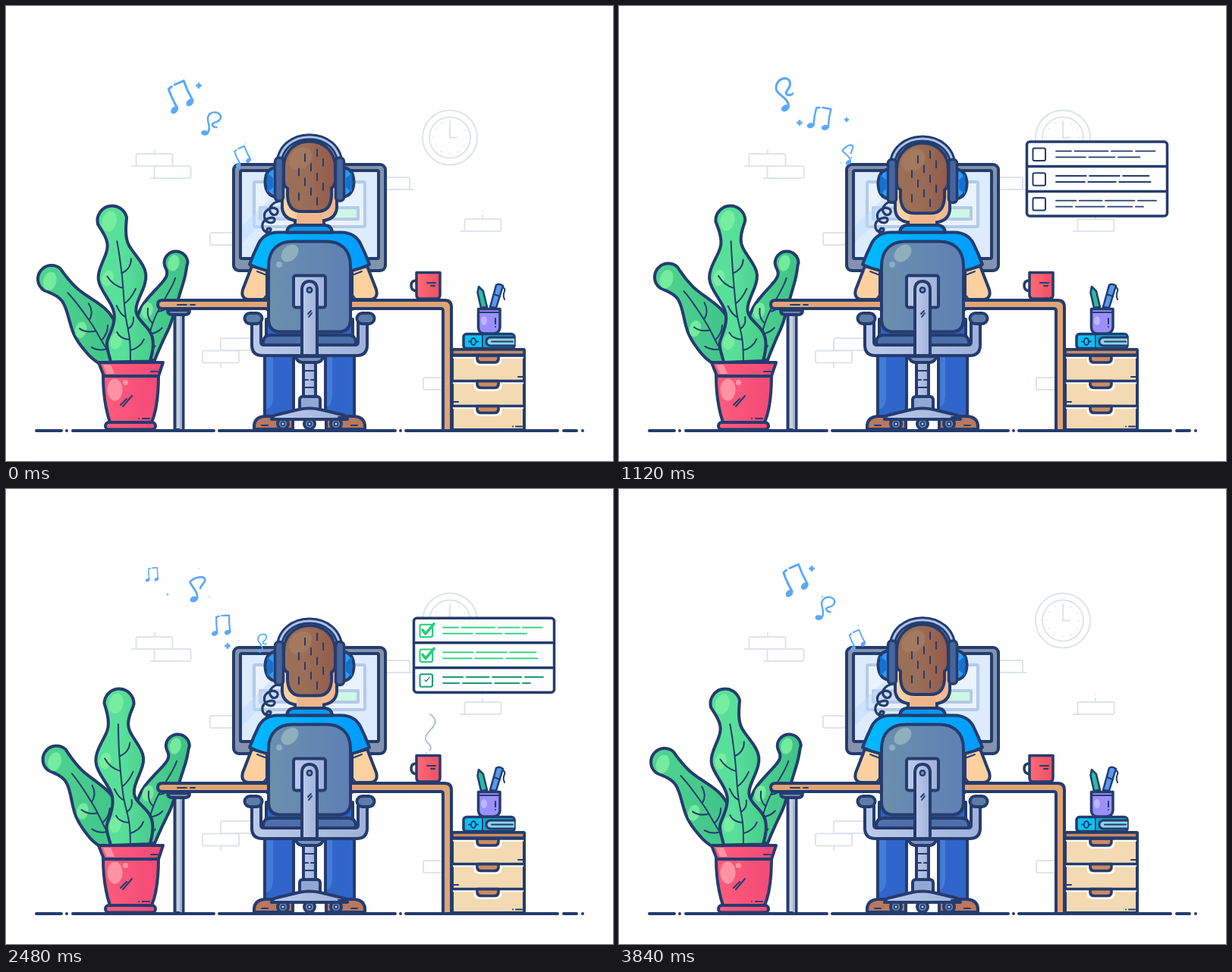
An HTML page that plays this animation: 800 px wide and 600 px high, repeating every 3880 ms.

```html
<!DOCTYPE html>
<html lang="en">
<head>
<meta charset="utf-8">
<title>Working day</title>
<style>
html, body { margin: 0; width: 100%; height: 100%; overflow: hidden; background: #fff; }
svg { display: block; width: 800px; height: 600px; }
.ink { stroke: #243c6e; stroke-width: 4; stroke-linejoin: round; stroke-linecap: round; }
.thin { stroke: #243c6e; stroke-width: 2; fill: none; stroke-linecap: round; stroke-linejoin: round; }
.wall { stroke: #dfe3ed; stroke-width: 2; fill: none; stroke-linecap: round; }
.flat { stroke: none; }
.note { stroke: #5aa9fb; fill: none; stroke-width: 2.6; stroke-linecap: round; stroke-linejoin: round; }
.note ellipse, #sparks { fill: #5aa9fb; stroke: none; }
.row { fill: none; stroke-width: 2; stroke-linecap: round; }
</style>
</head>
<body>
<svg viewBox="0 0 800 600">
<defs>
  <linearGradient id="gLeaf"><stop offset=".45" stop-color="#58e09a"/><stop offset="1" stop-color="#48cb8b"/></linearGradient>
  <linearGradient id="gSide"><stop offset="0" stop-color="#4fd592"/><stop offset="1" stop-color="#3fc187"/></linearGradient>
  <linearGradient id="gPot"><stop offset="0" stop-color="#ff5c7c"/><stop offset="1" stop-color="#f24a78"/></linearGradient>
  <linearGradient id="gHair"><stop offset=".4" stop-color="#9b6f57"/><stop offset="1" stop-color="#935a4b"/></linearGradient>
  <linearGradient id="gSkin"><stop offset="0" stop-color="#fdd6a6"/><stop offset="1" stop-color="#f2b38f"/></linearGradient>
  <linearGradient id="gShirt"><stop offset="0" stop-color="#00b9ff"/><stop offset="1" stop-color="#009bff"/></linearGradient>
  <linearGradient id="gChair"><stop offset="0" stop-color="#6b8fae"/><stop offset="1" stop-color="#5e80b4"/></linearGradient>
  <linearGradient id="gSteel"><stop offset="0" stop-color="#bccaea"/><stop offset="1" stop-color="#9fb1da"/></linearGradient>
  <linearGradient id="gMug"><stop offset="0" stop-color="#ff6b74"/><stop offset="1" stop-color="#ee4f66"/></linearGradient>
</defs>

<g class="wall">
  <g id="bricks"></g>
  <path d="M166 211h8M191 227h8M196 190v5M531 242h6M599 297h8M628 276v4M628 271v0M283 471v5"/>
  <circle cx="585" cy="173.500" r="36"/><circle cx="585" cy="173.500" r="27"/>
  <circle cx="585" cy="173.500" r="21.500" stroke-dasharray="0 11.258"/>
  <path d="M585 153v20.500h9"/>
</g>

<g id="list" class="ink" stroke-linejoin="round">
  <g id="card"><rect x="537.500" y="0" width="185" height="98" rx="4" fill="#fff" stroke-width="3.500"/>
  <path d="M538 32.500h184M538 65.500h184" stroke-width="3.500"/></g>
</g>

<g id="plant" class="ink"></g>
<g class="ink" fill="url(#gPot)">
  <path d="M128 487H201Q201 528 192 549H137Q128 522 128 487Z"/>
  <path d="M122 470H207L201 488H129Z"/><rect x="131" y="549" width="66" height="9.500" rx="4.500"/>
  <g class="flat" fill="#ff93a4"><ellipse cx="143.500" cy="506" rx="10" ry="14.500"/><circle cx="157.500" cy="496.500" r="3.500"/><path d="M128 473h10l5 12h-10Z"/></g>
  <path class="thin" d="M151 526l8-8M154 528l12-14M191 482h9M180 544h9M175 544h0"/>
</g>

<g class="ink">
  <rect x="300" y="209" width="200" height="140" rx="7" fill="#8493ad"/>
  <rect x="309" y="217" width="182" height="116" rx="2" fill="#dcebfe"/>
  <g class="flat">
    <g fill="none" stroke="#b4cae9" stroke-width="4"><rect x="327" y="232" width="146" height="59" rx="2" fill="#e9f3ff"/>
    <rect x="335" y="266" width="45" height="15" fill="#cfdcf1"/><rect x="420" y="266" width="44" height="15" fill="#cdf8e4"/></g>
    <path d="M311 312V290L384 219H408Z" fill="#c2dcfd" opacity=".5"/>
  </g>
</g>

<g id="sparks"></g>
<g id="notes"></g>

<g class="ink"><path fill="none" stroke-width="3.200" d="M361 257C350 259 344 268 350 274C354 278 361 273 357 268C350 263 338 270 341 280C343 287 355 288 354 281C352 276 336 281 338 292C340 300 350 299 349 294C345 291 341 296 345 304"/></g>

<g class="ink">
  <path d="M381 262H419V293H381Z" fill="#f3b98e"/>
  <g id="head">
    <g id="cup">
      <path d="M356 213Q342 214 341.500 232Q342 250 356 252Z" fill="#2a9cfb"/>
      <path class="flat" d="M344 220l8 7v12l-8 7Z" fill="#1570cf"/>
    </g>
    <use href="#cup" transform="matrix(-1 0 0 1 800 0)"/>
    <path d="M364 232V266Q365 280 381 283H419Q435 280 436 266V232Z" fill="url(#gSkin)"/>
    <path class="flat" d="M383 274H417V288H383Z" fill="#f1b58c"/>
    <path d="M360 212C358 159.500 442 159.500 440 212" fill="none" stroke-width="9"/>
    <path d="M360 212C358 159.500 442 159.500 440 212" fill="none" stroke="#aac4ee" stroke-width="3"/>
    <path d="M366 213C366 167 434 167 434 213V231Q433 238 429 240V250Q428 271 411 271H389Q372 271 371 250V240Q366 238 366 231Z" fill="url(#gHair)"/>
    <ellipse class="flat" cx="388" cy="201" rx="17" ry="13" fill="#aa8063" opacity=".6" transform="rotate(-40 388 201)"/>
    <path id="hair" class="thin"/>
    <g id="clip"><rect x="354.500" y="200" width="11" height="57" rx="5" fill="#46659d" stroke-width="3.500"/></g>
    <use href="#clip" transform="matrix(-1 0 0 1 800 0)"/>
  </g>
</g>

<g class="ink">
  <g id="arm"><path d="M324 343L312 374Q309 386 320 387H350V350Z" fill="#fcd09f"/><path class="thin" d="M331 350l13 5M344 380l-4 5"/></g>
  <use href="#arm" transform="matrix(-1 0 0 1 800 0)"/>
  <path d="M358 298.500H442Q460 299 467 313Q474 327 479 341Q468 346 456 349V400H344V349Q332 346 321 341Q326 327 333 313Q340 299 358 298.500Z" fill="url(#gShirt)"/>
  <path d="M370 298.500Q371 289 381 289H419Q429 289 430 298.500Z" fill="#0b98ec"/>
</g>

<g class="ink">
  <g id="leg">
    <path d="M341 458H379V541H341Z" fill="#3065cb"/>
    <path d="M327 558V553Q328 542 341 541H378V558Z" fill="#b97860"/>
    <path class="thin" d="M337 553h8"/>
  </g>
  <use href="#leg" transform="matrix(-1 0 0 1 800 0)"/>
  <path class="flat" d="M343 460h9v58q-1 12-9 14ZM423 460h7v55q-1 12-7 14Z" fill="#437bd8"/>
  <rect x="222.500" y="405" width="11" height="154" fill="#c8d1e2"/>
  <path class="flat" d="M229 408h3v150h-3Z" fill="#a5b3cc"/>
  <path d="M213 401H242Q242 407 236 407H219Q213 407 213 401Z" fill="#7187b4"/>
  <path d="M206 388H578Q587 388 587 397V560H576V402Q576 399 573 399H206Q200 399 200 393.500Q200 388 206 388Z" fill="#e2a474"/>
  <path class="thin" d="M226 394h12M243 394h6"/>
</g>

<g class="ink">
  <path d="M343 413H457V440H343Z" fill="#2d62c8"/>
  <path d="M339 448V442Q340 434 349 434H451Q460 434 461 442V448Z" fill="#4d6faa"/>
  <path d="M324 418V447Q324 461 338 461H462Q476 461 476 447V418H464V443Q464 447 460 447H340Q336 447 336 443V418Z" fill="url(#gSteel)"/>
  <g fill="#5d7da9"><rect x="314.500" y="405" width="23" height="14" rx="7"/><rect x="462.500" y="405" width="23" height="14" rx="7"/></g>
  <path d="M346 414V343C346 320 360 310.500 378 310.500H422C440 310.500 454 320 454 343V414Q453 429 440 429.500H360Q347 429 346 414Z" fill="url(#gChair)"/>
  <g class="flat" fill="#8eb0bd"><ellipse cx="374" cy="326" rx="13" ry="9.500" transform="rotate(-45 374 326)"/><circle cx="360" cy="341" r="4"/></g>
  <rect x="379" y="355.500" width="42" height="42" rx="3" fill="url(#gSteel)"/>
  <path d="M382 462H418Q417 469 410 470H390Q383 469 382 462Z" fill="#7890bf"/>
  <rect x="392" y="470" width="16" height="48" fill="url(#gSteel)"/>
  <path class="thin" d="M393 481h14M393 493h5M402 493h5M393 503h14"/>
  <path d="M390 461V373Q391 363 400 363Q409 363 410 373V461Z" fill="url(#gSteel)"/>
  <circle cx="400" cy="374.500" r="3.200" fill="#8499c6" stroke-width="2.500"/>
  <path class="thin" d="M398 406l4-4M399 410l4-5"/>
  <rect x="387" y="515" width="27" height="20" rx="4" fill="#91a7d4"/>
  <g id="wheels" fill="#7895c2"></g>
  <path d="M350 545Q351 540 357 539L386 532Q400 529 414 532L443 539Q449 540 450 545Z" fill="url(#gSteel)"/>
  <path class="thin" d="M438 542h8"/>
</g>

<path id="steam" fill="none" stroke="#a9bfe9" stroke-width="2" stroke-linecap="round" pathLength="1" d="M554 348C559 346 562 341 558 337C552 332 551 328 555 323C559 317 565 314 566 307C565 302 562 299 559 297"/>

<g class="ink">
  <path d="M541 362Q534 362 534 368.500Q534 375 541 376" fill="none" stroke-width="3.500"/>
  <path d="M541 351.500H572V381Q572 386 567 386H546Q541 386 541 381Z" fill="url(#gMug)" stroke-width="3.500"/>
  <path class="thin" d="M555 365h11M560 369h5"/>
  <rect x="588" y="453" width="95" height="106" rx="2" fill="#f3dab3"/>
  <path d="M588 453H683V460H588Z" fill="#c98b61" stroke-width="3.500"/>
  <g id="drawer"><path d="M590 463.500H618V469Q619 473 624 473H646Q651 473 652 469V463.500H681" stroke="#fff" stroke-width="2.500" fill="none"/>
  <path d="M621 461H649V466Q648 470 644 470H626Q622 470 621 466Z" fill="#cd8a5f" stroke-width="3.500"/><path d="M588 461H683" stroke-width="3.500"/></g>
  <use href="#drawer" y="33.500"/><use href="#drawer" y="66.500"/>
  <path class="thin" d="M675 489h6M590 522h6M672 554.500h8M668 554.500h0"/>
  <rect x="603" y="432.500" width="67" height="19" rx="4" fill="#08c3f2" stroke-width="3.500"/>
  <path class="flat" d="M630 434h38v16h-38Z" fill="#119fc4"/>
  <path d="M670 437H638Q633 438 633 442.500Q633 447 638 448H670" fill="#8fd3e6" stroke-width="3"/>
  <path class="thin" d="M628 433v18M640 442.500h28M610 442.500h3M619 442.500h3"/><ellipse class="thin" cx="616" cy="442.500" rx="3" ry="4.500"/>
  <path d="M626 398L621.500 378L623 370L629 376L634 397Z" fill="#28bda0" stroke-width="2.500"/>
  <path d="M638 397L646 368Q650 365 655 369L646 398Z" fill="#559af0" stroke-width="2.500"/>
  <path class="thin" d="M655 371q4 2 1 8q-1 4 1 8M643 380l8 3"/>
  <path d="M622.500 399.500H651V424Q650 432 642 432H631Q623 432 622.500 424Z" fill="#9b90fa" stroke-width="3.500"/>
  <path class="thin" d="M624 404h26M645 412v7M645 423v0"/><ellipse class="flat" cx="630" cy="415" rx="4" ry="6" fill="#beb5ff"/>
</g>
<path class="ink" fill="none" d="M40 560H73M80 560h0M88 560H274M281 560H513M520 560h0M527 560H727M735 560H752M760 560h0"/>
</svg>

<script>
const LOOP = 3880, HALF = LOOP / 2, STEP = 40, TAU = 2 * Math.PI;
const NAVY = [36, 60, 110], GREEN = [34, 207, 120];
const $ = id => document.getElementById(id);
const clamp = v => Math.max(0, Math.min(1, v));
const mix = (a, b, k) => a + (b - a) * k;

function add(parent, tag, attrs) {
  const el = document.createElementNS('http://www.w3.org/2000/svg', tag);
  for (const k in attrs) el.setAttribute(k, attrs[k]);
  return parent.appendChild(el);
}

let seed = 7;
const random = () => (seed = seed * 16807 % 2147483647) / 2147483647;

// Still details
for (const [x, y] of [[171.5, 195], [195.5, 211], [484, 226], [269, 299], [604.5, 281], [283, 438], [259, 454.5], [550, 490]]) {
  add($('bricks'), 'rect', { x, y, width: 48, height: 16, rx: 2 });
}
for (const cx of [365, 400, 435]) {
  add($('wheels'), 'circle', { cx, cy: 551, r: 7 });
  add($('wheels'), 'circle', { cx, cy: 551, r: 2.5, fill: '#c3d2ef', 'stroke-width': 2 });
}
let hair = '';
for (let i = 0; i < 11; i++) hair += `M${380 + (i * 24 + 30) % 40} ${189 + 6.4 * i}v9`;
$('hair').setAttribute('d', hair);

// Plant: each spine runs from tip to root through [x, y, half width]
const leaves = [
  {
    fill: 'url(#gSide)',
    spine: [[224, 339, 15.5], [222, 362, 12], [198, 407, 22], [187, 440, 19], [182, 465, 14]],
    sway: ([x, y, w], a) => [x - 3.3 * Math.sin(a) * (465 - y) / 140, y, w]
  },
  {
    fill: 'url(#gSide)',
    spine: [[60, 360, 18], [84, 381, 13], [112, 418, 27], [130, 448, 24], [146, 470, 14]],
    sway([x, y, w], a) {
      const k = (1 - Math.cos(a)) / 2 * clamp((462 - y) / 100);
      return [x + 8 * k, y - 4 * k, w];
    }
  },
  {
    fill: 'url(#gLeaf)',
    spine: [[140, 283, 19.5], [147, 314, 13.5], [153, 357, 31.5], [157, 404, 14.5], [163, 440, 30], [164, 469, 26]],
    sway([x, y, w], a) {
      const h = (468 - y) / 185;
      return [x + 55 * h * h * (h - .8) * (1 - Math.cos(a)) / 2, y, w];
    }
  }
];
for (const leaf of leaves) {
  leaf.path = add($('plant'), 'path', { fill: leaf.fill });
  leaf.spots = leaf.spine.filter(([, , w], i) => i % 2 === 0 && w > 15)
    .map(() => add($('plant'), 'ellipse', { class: 'flat', fill: '#7df0a0', opacity: .85 }));
  leaf.vein = add($('plant'), 'path', { class: 'thin' });
}

// Catmull-Rom point at u, counted in key points.
function along(keys, u) {
  const i = Math.min(Math.floor(u), keys.length - 2), k = u - i;
  const get = n => keys[Math.max(0, Math.min(keys.length - 1, n))];
  const [a, b, c, d] = [get(i - 1), get(i), get(i + 1), get(i + 2)];
  return b.map((v, n) => v + k / 2 * (c[n] - a[n] + k * (2 * a[n] - 5 * v + 4 * c[n] - d[n] + k * (3 * (v - c[n]) + d[n] - a[n]))));
}

// Point beside the spine; side is a share of the half width.
function beside(keys, u, side) {
  const [x, y, w] = along(keys, u);
  const [x0, y0] = along(keys, Math.max(0, u - .1));
  const [x1, y1] = along(keys, Math.min(keys.length - 1, u + .1));
  const len = Math.hypot(x1 - x0, y1 - y0);
  return [x + (y1 - y0) / len * w * side, y - (x1 - x0) / len * w * side];
}

function drawLeaf(leaf, angle) {
  const keys = leaf.spine.map(p => leaf.sway(p, angle)), end = keys.length - 1;
  const left = [], right = [];
  for (let u = 0; u <= end; u += .125) {
    left.push(beside(keys, u, -1));
    right.unshift(beside(keys, u, 1));
  }
  const r = keys[0][2];
  leaf.path.setAttribute('d', `M${right.join('L')}A${r} ${r} 0 0 0 ${left.join('L')}Z`);

  let vein = '';
  for (let u = .9; u <= end; u += .1) vein += (vein ? 'L' : 'M') + along(keys, u).slice(0, 2);
  for (let n = 0, u = 1.9; u < end - .2; n++, u += .42) {
    const side = n % 2 ? -1 : 1;
    vein += `M${along(keys, u).slice(0, 2)}Q${beside(keys, u - .1, side * .45)} ${beside(keys, u - .38, side * .62)}`;
  }
  leaf.vein.setAttribute('d', vein);

  leaf.spots.forEach((el, i) => {
    const [x, y] = beside(keys, 2 * i, i ? -.6 : -.2), size = i ? 7.5 : r * .48;
    el.setAttribute('rx', size);
    el.setAttribute('ry', size * 1.45);
    el.setAttribute('transform', `translate(${x} ${y}) rotate(15)`);
  });
}

// Music: notes rise on a wavy line, grow, then shrink away
const dot = x => `<ellipse cx="${x}" rx="5" ry="3.600" transform="rotate(-20 ${x} 0)"/>`;
const PAIR = `<g transform="translate(-13 13)">${dot(0)}${dot(20)}<path d="M4-1Q3-14 4.500-25M24-1Q23-14 24.500-26M4.500-25L9-26M13-26.500L24.500-26"/></g>`;
const single = flag => `<g transform="translate(-4 16)">${dot(0)}<path d="M4-1C6-10-3-15-5-22${flag}"/></g>`;
const CURL = single('C-5-36 13-36 12-27C12-20 3-19 5-15Q8-12 12-14');
const HOOK = single('C-1-27 12-31 14-25C14-21 9-18 8-14');
const notes = [PAIR, CURL, PAIR, HOOK].map((shape, i) => {
  const el = add($('notes'), 'g', { class: 'note' });
  el.innerHTML = shape;
  return { el, delay: i * LOOP / 4, lean: shape === PAIR ? [-8, -18] : [4, 20] };
});

function drawNotes(t) {
  const beat = Math.cos(TAU * t / HALF);
  for (const { el, delay, lean } of notes) {
    const age = (t + 960 + delay) % LOOP - 500;
    const wave = Math.sin(TAU * age / 2750);
    const x = 340 - .0487 * age - 8 * wave, y = 203 - .0325 * age + 10.5 * wave;
    const size = Math.max(0, Math.min(.65 + age / 5000, (3320 - age) / 650));
    el.setAttribute('transform', `translate(${x} ${y}) rotate(${lean[0] + lean[1] * beat}) scale(${size})`);
  }
}

// Sparkles: x, y, size, time of the brightest moment
const sparks = [
  [254, 105, 3.8, 0], [300, 150, 3.6, 1300], [238, 154, 3.7, 1100], [292, 207, 3.8, 600],
  [213, 139, 1.5, 600], [268, 142, 1.4, 200], [315.5, 180, 1.3, 1600], [306.5, 200, 1.4, 900]
].map(([x, y, size, peak]) => ({
  x, y, size, peak, el: add($('sparks'), 'path', { d: 'M-.38-1H.38V-.38H1V.38H.38V1H-.38V.38H-1V-.38H-.38Z' })
}));

function drawSparks(t) {
  for (const { x, y, size, peak, el } of sparks) {
    const glow = (.5 + .5 * Math.cos(TAU * (t - peak) / HALF)) ** 2;
    el.setAttribute('transform', `translate(${x} ${y}) scale(${size * glow})`);
  }
}

// Task list
function dashes(y, end) {
  let d = '';
  for (let x = 576; x < end - 8;) {
    const stop = Math.min(end, x + 20 + 26 * random());
    d += `M${x} ${y}H${stop}`;
    x = stop + 4.5;
  }
  return d;
}
const rows = [0, 1, 2].map(i => {
  const g = add($('card'), 'g', { class: 'row', transform: `translate(0 ${i * 32.7})` });
  add(g, 'rect', { x: 545.5, y: 8.5, width: 16.5, height: 16.5, rx: 2 });
  add(g, 'path', { 'stroke-width': 1.8, d: dashes(12.3, 708) + dashes(20.3, i === 1 ? 708 : 697 - 3 * i) });
  const mark = add(g, 'path', { d: 'M-5-1L-1 4L10-9', 'stroke-width': 3.6 });
  return { g, mark, start: 1300 + 560 * i };
});

function drawList(t) {
  const y = 179 - 11 * Math.sin(TAU / 4 * clamp((t - 1480) / 1720));
  $('list').setAttribute('opacity', clamp((t - 440) / 350) * clamp((3560 - t) / 480));
  $('card').setAttribute('transform', `translate(0 ${y})`);
  for (const { g, mark, start } of rows) {
    const k = clamp((t - start) / 150);
    g.setAttribute('stroke', `rgb(${NAVY.map((c, i) => Math.round(mix(c, GREEN[i], clamp(k * 1.6))))})`);
    mark.setAttribute('transform', `translate(554 16.500) scale(${k})`);
    mark.setAttribute('visibility', k ? 'visible' : 'hidden');
  }
}

function drawSteam(t) {
  const from = clamp((t - 2400) / 850), to = clamp((t - 1470) / 1000) ** 1.5;
  $('steam').setAttribute('visibility', to > from ? 'visible' : 'hidden');
  $('steam').setAttribute('stroke-dasharray', `0 ${from} ${Math.max(0, to - from)} 2`);
}

function draw(t) {
  for (const leaf of leaves) drawLeaf(leaf, TAU * t / LOOP);
  drawNotes(t);
  drawSparks(t);
  drawList(t);
  drawSteam(t);
  $('head').setAttribute('transform', `translate(0 ${1.25 * (1 - Math.cos(TAU * t / HALF))})`);
}

function tick(now) {
  draw(Math.floor(now % LOOP / STEP) * STEP);
  requestAnimationFrame(tick);
}
draw(0);
requestAnimationFrame(tick);
</script>
</body>
</html>
```
